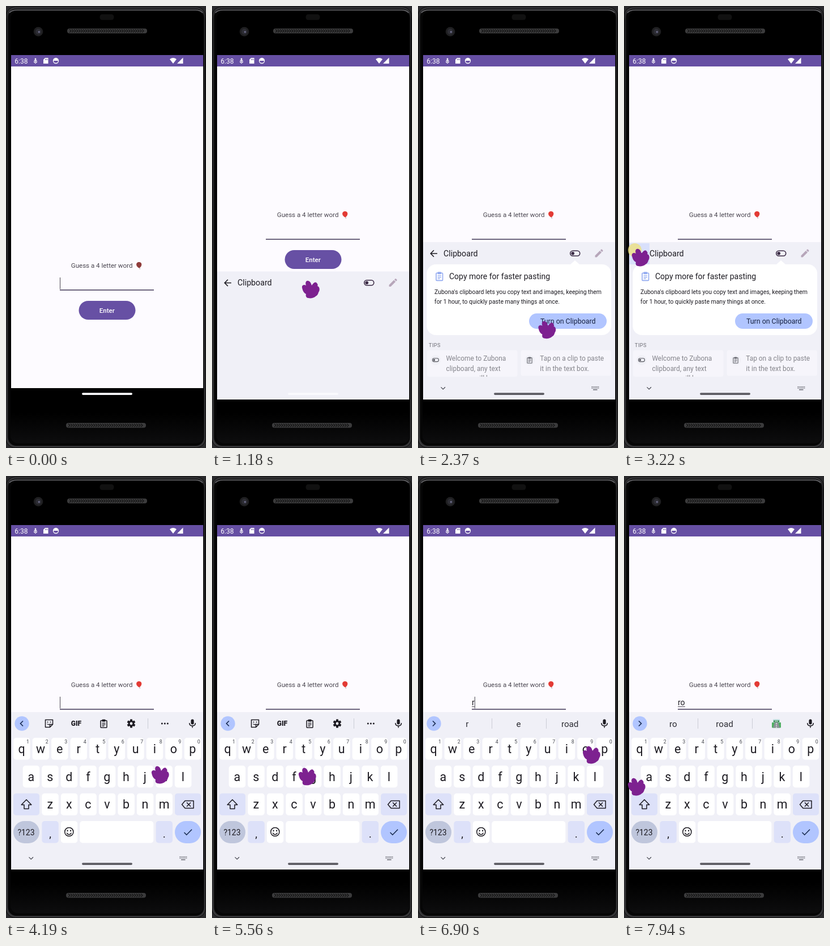
An HTML page that plays this animation: 353 px wide and 775 px high, repeating every 8 s.

```html
<!DOCTYPE html>
<html lang="en">
<head>
<meta charset="utf-8">
<title>Word guess</title>
<style>
html, body { margin: 0; width: 100%; height: 100%; overflow: hidden; background: #000; }
svg { display: block; width: 353px; height: 775px; }
text { font-family: Roboto, "Open Sans", sans-serif; white-space: pre; }
</style>
</head>
<body>
<svg id="stage" viewBox="0 0 353 775" xmlns="http://www.w3.org/2000/svg"></svg>
<script>
const LOOP = 8000;
const INK = '#1d1b22', PANEL = '#f0f0f7', BLUE = '#b1c5ff', LILAC = '#dde1f9', PURPLE = '#6750a4';

// Markup helpers
const rect = (x, y, w, h, fill, r = 0, more = '') =>
  `<rect x="${x}" y="${y}" width="${w}" height="${h}" rx="${r}" fill="${fill}" ${more}/>`;
const circle = (x, y, r, fill, more = '') => `<circle cx="${x}" cy="${y}" r="${r}" fill="${fill}" ${more}/>`;
const line = (d, color = INK, w = 1.5, more = '') =>
  `<path d="${d}" fill="none" stroke="${color}" stroke-width="${w}" ${more}/>`;
const shape = (d, fill, more = '') => `<path d="${d}" fill="${fill}" ${more}/>`;
const text = (x, y, s, size, fill = INK, more = '') =>
  `<text x="${x}" y="${y}" font-size="${size}" fill="${fill}" ${more}>${s}</text>`;
const mid = 'text-anchor="middle"';
const bold = 'font-weight="500"';
const group = (id, body, more = '') => `<g id="${id}" ${more}>${body}</g>`;
const gradient = (id, ...stops) => `<linearGradient id="${id}" x2="0" y2="1">` +
  stops.map(([at, color]) => `<stop offset="${at}" stop-color="${color}"/>`).join('') + '</linearGradient>';

const clipIcon = (x, y, s, color) => `<g transform="translate(${x} ${y}) scale(${s})">` +
  rect(-5.5, -5.5, 11, 12.5, 'none', 1, `stroke="${color}" stroke-width="1.5"`) +
  rect(-3, -7.5, 6, 4, color, 1) +
  line('M-3 -1H3M-3 1.5H3M-3 4H1', color, 1.2) + '</g>';
const toggleIcon = (x, y, s, color) => `<g transform="translate(${x} ${y}) scale(${s})">` +
  rect(-8.5, -4.5, 17, 9, 'none', 4.5, `stroke="${color}" stroke-width="1.6"`) + circle(-4, 0, 2.8, color) + '</g>';

function speaker(x, y) {
  let s = rect(x, y, 141, 8.5, '#3b3b3c', 4);
  for (let i = 4; i < 136; i += 4) s += line(`M${x + i} ${y + 1.5}l3 2.7l-3 2.7`, '#131313', 1.3);
  return s;
}

function phone() {
  return rect(0, 0, 353, 775, '#29292b') +
    rect(-.5, 1.5, 353, 773, 'url(#rim)', 17, 'stroke="#0a0a0a"') +
    rect(3, 4.5, 347, 767, '#060606', 15, 'stroke="#2c2c2e" stroke-width="1.2"') +
    line('M6 12Q10 7 20 7H334Q343 7 347 12', '#6c6c70', 1.3) +
    rect(8, 9.5, 341, 757, 'url(#glass)', 13) +
    rect(165.5, 14.5, 25, 10, '#111', 4.5) +
    circle(57, 45, 8.3, '#1f1f21') + circle(57, 45, 5, '#2d2d34') + circle(58.3, 45.5, 1.7, '#6a6a86') +
    speaker(108, 39.5) + speaker(106, 731);
}

function statusBar() {
  return rect(9, 86, 339, 20, '#664fa3') +
    text(15.3, 100.5, '6:38', 12, '#fff') +
    line('M52 92.5V97M49.7 95L52 97.3L54.3 95M49 97.5L52 100.3L55 97.5', '#fff', 1.2) +
    circle(52, 93, 1.4, '#fff') +
    shape('M66 94L69 91H74.5V101H66Z', '#fff') + line('M69.5 92.5V95M71.2 92.5V95M73 92.5V95', '#664fa3', .8) +
    circle(88, 96, 4.5, 'none', 'stroke="#fff" stroke-width="1.3"') + shape('M84 94.5A4.2 4.2 0 0 1 92 94.5V96H84Z', '#fff') +
    shape('M289 93.3Q295 88.8 301 93.3L295 101Z', '#fff') +
    shape('M302 101L312.5 90.5V101Z', '#fff');
}

function app() {
  return text(114.8, 459.3, 'Guess a 4 letter word', 11.55, '#49454f') +
    group('balloon', shape('M234.8 449C238 449 239.7 451.3 239.3 454C239 456.5 236.8 458.8 235 459.6C232.5 458.5 230.2 456.3 230.1 453.6C230 451 232 449 234.8 449Z', 'currentColor') +
      line('M235.5 459.3Q237 460.2 236 461.5', '#70605c', .8)) +
    rect(95, 497.2, 166, 1.6, '#4c4360') +
    text(95, 491.3, '', 14, INK, 'id="typed"') +
    rect(95, 493, 0, .9, '#3b3842', 0, 'id="composing"') +
    rect(95, 476, 1, 20.5, '#49454f', 0, 'id="caret"') +
    rect(128.5, 517, 100, 33, PURPLE, 16.5) +
    text(178.3, 537.8, 'Enter', 11.55, '#fff', `${mid} ${bold}`);
}

function panelFooter() {
  let s = line('M40.5 668.3L44.2 672L48 668.3', '#44464f', 1.2);
  for (let row = 0; row < 2; row++)
    for (let i = 0; i < 6; i++) s += rect(306.4 + i * 2.3, 667 + row * 2.4, 1.3, 1.3, '#55565f');
  return s + rect(309, 672.2, 7.5, 1.3, '#55565f');
}

function clipboardHeader() {
  return rect(9, 416, 36, 37, '#d9e0fb', 0, 'id="backPress"') +
    line('M34 434H22.5M28 428.3L22.3 434L28 439.7', INK, 1.6) +
    text(45, 439, 'Clipboard', 14.2) +
    toggleIcon(277.2, 433.8, 1, '#3b2b45') +
    shape('M312.5 437.6L321 429.1L324 432.1L315.5 440.6H312.5ZM321.9 428.2L323.3 426.8Q324 426.2 324.7 426.8L326.3 428.4Q326.9 429.1 326.3 429.8L324.9 431.2Z', '#b7a6ba');
}

function clipboardBody() {
  const grey = '#85858c';
  const tip = (x, ...lines) => lines.map((s, i) => text(x, 622 + i * 17.7, s, 11.9, grey)).join('');
  return shape('M268 454L277 446L286 454Z', '#fff') +
    rect(15.5, 453, 325.5, 124, '#fff', 16) +
    clipIcon(37.8, 474, 1.05, '#92aaf0') +
    text(55, 478.6, 'Copy more for faster pasting', 14) +
    text(29, 504.8, "Zubona's clipboard lets you copy text and images, keeping them", 10.45) +
    text(29, 521.8, 'for 1 hour, to quickly paste many things at once.', 10.45) +
    rect(196, 539, 137, 27, BLUE, 13.5) +
    text(264.7, 557, 'Turn on Clipboard', 12.4, '#16213f', mid) +
    text(19, 598, 'TIPS', 9.2, '#6c6c74', 'letter-spacing=".4"') +
    rect(16, 603.5, 159.5, 46.5, '#f6f5fb', 4) + rect(181.5, 603.5, 159.5, 45, '#f6f5fb', 4) +
    circle(31, 621, 9, '#f0f0f6') + toggleIcon(31, 620.7, .65, '#55565e') +
    circle(197, 621, 9, '#f0f0f6') + clipIcon(197, 621, .75, '#66676f') +
    '<g clip-path="url(#tipClip)">' +
    tip(49.5, 'Welcome to Zubona', 'clipboard, any text', 'you copy will be') +
    tip(215.3, 'Tap on a clip to paste', 'it in the text box.') + '</g>';
}

function keyboard() {
  const pitch = 33.52, width = 29.5, height = 38.5;
  let s = '';
  const row = (letters, x0, y) => [...letters].forEach((ch, i) => {
    const x = x0 + i * pitch;
    s += rect(x, y, width, height, '#fff', 5) + text(x + 14.6, y + 27, ch, 21.4, INK, mid);
    if (y < 500) s += text(x + 25.6, y + 9.9, (i + 1) % 10, 8.8, '#44464f', mid);
  });
  row('qwertyuiop', 13, 459);
  row('asdfghjkl', 29.7, 507.7);
  row('zxcvbnm', 63.3, 556.4);
  s += rect(13, 556.4, 46, height, LILAC, 5) + rect(298, 556.4, 46, height, LILAC, 5) +
    line('M36 567.5L27.2 576.5H32V583.5H40V576.5H44.8Z', INK, 1.5, 'stroke-linejoin="round"') +
    line('M316 569.5H331V582.5H316L310.5 576Z', INK, 1.5, 'stroke-linejoin="round"') +
    line('M319 572.5L326 579.5M326 572.5L319 579.5', INK, 1.5);
  const y = 605;
  s += rect(13, y, 46, height + .5, '#bfc6dc', 19.5) + text(35.5, 629.8, '?123', 14, INK, mid) +
    rect(63.3, y, width, height, LILAC, 5) + text(78, 634, ',', 19, INK, mid) +
    rect(96.8, y, width, height, '#fff', 5) +
    circle(111.3, 624, 7.6, 'none', `stroke="${INK}" stroke-width="1.5"`) +
    circle(108.5, 622, 1.2, INK) + circle(114.1, 622, 1.2, INK) + line('M107.3 625.6Q108.6 628.6 111.3 628.6Q114 628.6 115.3 625.6', INK, 1.4) +
    rect(130.3, y, 130, height, '#fff', 5) +
    rect(264.5, y, width, height, LILAC, 5) + text(279.2, 634, '.', 19, INK, mid) +
    rect(298, y, 46, height + .5, BLUE, 19.5) + line('M314.5 625L318.7 629.2L328 619.8', '#17294f', 1.6);
  return s;
}

function gear(x, y) {
  let s = '';
  for (let a = 0; a < 360; a += 60) s += rect(-2, -7.4, 4, 4, INK, .6, `transform="translate(${x} ${y}) rotate(${a})"`);
  return s + circle(x, y, 3.9, 'none', `stroke="${INK}" stroke-width="3"`);
}

function keyboardBar() {
  const divider = x => rect(x - .5, 425, 1, 18, '#cbccd6');
  const word = (id, x) => text(x, 439.8, '', 15.2, '#2d2d34', `id="${id}" ${mid}`);
  const tools =
    line('M69.5 427.5H82.5V435.5L77.5 440.5H69.5Z M77.5 440V435.5H82', INK, 1.5, 'stroke-linejoin="round"') +
    circle(73.5, 431.5, 1, INK) + circle(78.5, 431.5, 1, INK) + line('M72.5 434.5Q74.5 437 77 435', INK, 1.2) +
    text(124, 438, 'GIF', 12, INK, `${mid} font-weight="900"`) +
    clipIcon(172.5, 434.3, 1, INK) + gear(221, 434) + divider(250.5) +
    [275.3, 280.3, 285.3].map(x => circle(x, 434, 1.5, INK)).join('');
  const road = rect(261, 432, 16, 9.5, '#4fae62', 1) + rect(263, 426.5, 12, 6, '#bfe0e0', 1) +
    shape('M266 432H272L275 441.5H263Z', '#8b9296') + line('M269 433V441.5', '#fff', 1.2, 'stroke-dasharray="2 1.3"') +
    rect(264, 428.5, 10, 3.2, '#35874f', .5) + line('M266 430H272', '#fff', .9);
  return circle(28, 434, 12.7, BLUE) + line('', '#1b2c55', 1.7, 'id="chevron"') +
    group('tools', tools) +
    group('words', divider(130.5) + divider(226.5) + word('word0', 86.8) + word('word1', 177.6) + word('word2', 268.2) + group('road', road)) +
    rect(326.4, 426.5, 5.2, 9, INK, 2.6) + line('M323.7 433Q323.7 438 329 438Q334.3 438 334.3 433M329 438V441.5', INK, 1.5);
}

const $ = id => document.getElementById(id);
$('stage').innerHTML =
  `<defs><clipPath id="screenClip">${rect(9, 86, 339, 604, '#000')}</clipPath>` +
  `<clipPath id="tipClip">${rect(16, 600, 325, 50, '#000')}</clipPath>` +
  gradient('rim', [0, '#3a3a3c'], [.03, '#161617'], [.5, '#1a1a1b'], [1, '#38383a']) +
  gradient('glass', [0, '#000'], [.93, '#000'], [1, '#0d0d0e']) + '</defs>' +
  phone() + rect(9, 106, 339, 564, '#fdfbff') + statusBar() + group('app', app()) +
  '<g clip-path="url(#screenClip)">' +
  group('panel', rect(9, 414, 339, 276, PANEL) +
    group('clipboard', clipboardHeader() + group('clipBody', clipboardBody())) +
    group('keyboard', keyboardBar() + keyboard()) + panelFooter()) + '</g>' +
  rect(134, 678.2, 89, 3.7, '#fff', 1.8, 'id="homeBar"') +
  group('pointer', circle(-10, -13, 12, '#efe27a', 'id="halo" opacity=".75"') +
    shape('M-15 -3C-16 -8 -11 -9 -8 -7C-10 -12 -8 -16 -4 -15C0 -14 1 -10 2 -7C5 -12 9 -14 11 -11C13 -9 13 -7 12 -6C16 -5 17 1 14 5C13 9 11 11 9 12C6 15 0 16 -4 15C-8 15 -9 11 -8 8C-12 6 -14 2 -15 -3Z', '#7d2190'));

// Pointer stops: time, x, y
const stops = [
  [70, 345, 785], [350, 255, 630], [650, 178, 503], [830, 174, 497], [1800, 174, 497],
  [2250, 233, 572], [2520, 220, 562], [2950, 24, 440], [3150, 29, 441], [3430, 29, 441],
  [4190, 272, 524], [4500, 294, 543], [5030, 268, 555], [5100, 268, 555],
  [5350, 190, 555], [5560, 168, 527], [5850, 102, 492], [6140, 138, 491], [6480, 141, 491],
  [6850, 306, 489], [7320, 308, 489], [7740, 15, 551], [7940, 22, 545], [8000, 22, 545]];
const clicks = [[830, 960], [3150, 3360], [6340, 6450], [7230, 7340]];
const blinkStarts = [0, 600, 3700, 6430, 7370];
const OPEN = 1000, LOADED = 1740, BACK = 3150, KEYS = 3430, FIRST = 6430, SECOND = 7370;

const smooth = p => p * p * (3 - 2 * p);
const clamp = p => Math.max(0, Math.min(1, p));
const show = (id, on) => $(id).setAttribute('display', on ? 'inline' : 'none');
const move = (id, x, y) => $(id).setAttribute('transform', `translate(${x} ${y})`);

function pointerAt(t) {
  const i = Math.max(1, stops.findIndex(s => s[0] > t));
  const [t0, x0, y0] = stops[i - 1], [t1, x1, y1] = stops[i];
  const p = smooth(clamp((t - t0) / (t1 - t0)));
  return [x0 + (x1 - x0) * p, y0 + (y1 - y0) * p];
}

function render(t) {
  const open = t >= OPEN, keys = t >= KEYS, typing = t >= FIRST, both = t >= SECOND;
  move('app', 0, open ? -89 : 0);
  $('balloon').setAttribute('color', open ? '#e33b35' : '#8f3c3b');
  show('panel', open);
  move('panel', 0, 276 * (1 - smooth(clamp((t - OPEN) / 250))));
  show('clipboard', !keys);
  show('clipBody', t >= LOADED);
  show('backPress', t >= BACK);
  show('keyboard', keys);
  show('tools', !typing);
  show('words', typing);
  show('road', both);
  $('chevron').setAttribute('d', typing ? 'M26 429.5L30.5 434L26 438.5' : 'M30 429.5L25.5 434L30 438.5');
  const words = both ? ['ro', 'road', ''] : ['r', 'e', 'road'];
  words.forEach((w, i) => $('word' + i).textContent = w);
  $('homeBar').setAttribute('fill', t < LOADED ? '#fafafd' : '#5d5c63');

  const width = both ? 12.8 : typing ? 4.8 : 0;
  $('typed').textContent = both ? 'ro' : typing ? 'r' : '';
  $('composing').setAttribute('width', width);
  $('caret').setAttribute('x', 95 + width);
  const blink = blinkStarts.filter(s => s <= t).pop();
  show('caret', (t - blink) % 1000 < 500);

  show('pointer', t >= 70 && !(t >= 5100 && t < 5350));
  move('pointer', ...pointerAt(t));
  show('halo', clicks.some(([a, b]) => t >= a && t < b));
}

function tick() {
  render(performance.now() % LOOP);
  requestAnimationFrame(tick);
}
tick();
</script>
</body>
</html>
```
